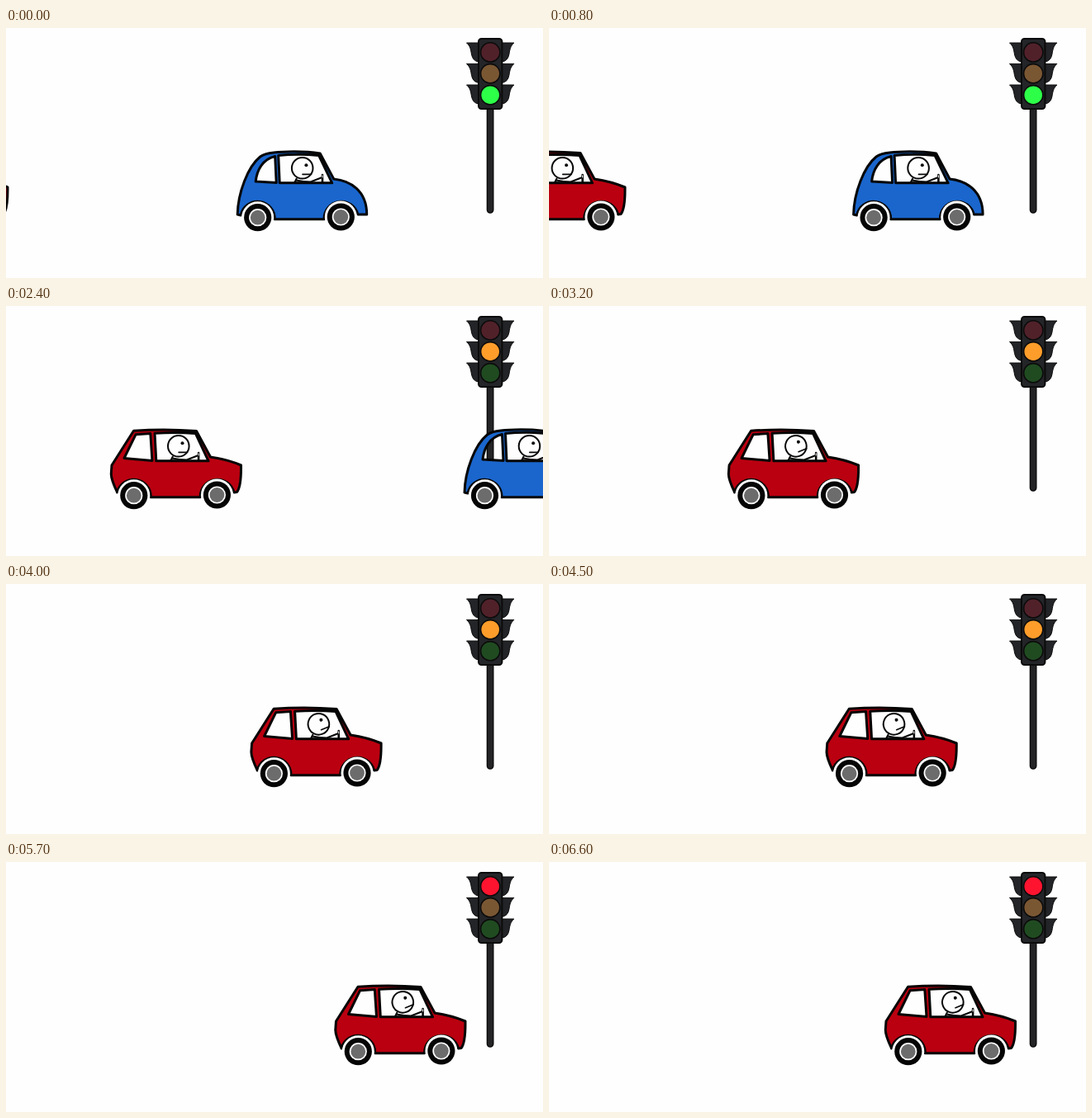
An HTML page that plays this animation: 650x303 px, repeating every 6700 ms.

```html
<!DOCTYPE html>
<html lang="en">
<head>
<meta charset="utf-8">
<title>Two cars and a traffic light</title>
<style>
  html, body { margin: 0; width: 100%; height: 100%; overflow: hidden; background: #fefefe; }
  svg { display: block; width: 650px; height: 303px; }
  .body { stroke: #050505; stroke-width: 3; stroke-linejoin: round; fill-rule: evenodd; }
  .line { fill: none; stroke: #080808; stroke-width: 2; stroke-linecap: round; stroke-linejoin: round; }
  .lamp { stroke: #0b0b0b; stroke-width: 1.6; }
</style>
</head>
<body>
<svg viewBox="0 0 650 303">
  <defs>
    <g id="wheel">
      <circle r="19.5" fill="#fefefe"/>
      <circle r="16.6" fill="#050505"/>
      <circle r="10.6" fill="#fefefe"/>
      <circle r="8.9" fill="#6c6c6c"/>
    </g>
    <g id="wheels">
      <use href="#wheel" x="26" y="229.7"/>
      <use href="#wheel" x="126.6" y="229"/>
    </g>
    <g id="torso" class="line">
      <path d="M73 182.5L70.5 187.5M72.5 184.5C79 186 84 186.5 90 186.5L104 181"/>
      <path d="M70.5 187.3H91" stroke-width="1.4"/>
      <path d="M104.3 178V187" stroke-width="2.6"/>
      <path d="M104.3 178.8V181" stroke="#fefefe" stroke-width="1"/>
    </g>
    <g id="head">
      <circle r="12.8" class="line" style="fill:#fefefe"/>
      <circle cx="4.7" cy="-3.6" r="2" fill="#080808"/>
      <path d="M.3 7.6H10.8" class="line" style="stroke-width:1.6"/>
    </g>
    <path id="visor" d="M572 18H557.5C562 22 562.5 26 563.5 32Q565 40 572 41Z"
      fill="#232427" stroke="#0b0b0b" stroke-linejoin="round"/>
    <g id="visors">
      <use href="#visor"/>
      <use href="#visor" y="25.4"/>
      <use href="#visor" y="51"/>
    </g>
  </defs>

  <g>
    <rect x="582.4" y="92" width="7.4" height="132" rx="3.5" fill="#242427" stroke="#0b0b0b" stroke-width="1.4"/>
    <use href="#visors"/>
    <use href="#visors" transform="translate(1172.4) scale(-1 1)"/>
    <rect x="572" y="13" width="28.4" height="85" rx="3.5" fill="#242528" stroke="#0b0b0b" stroke-width="2"/>
    <circle class="lamp" cx="586.2" cy="29.4" r="11.6"/>
    <circle class="lamp" cx="586.2" cy="55.2" r="11.6"/>
    <circle class="lamp" cx="586.2" cy="81.2" r="11.6"/>
  </g>

  <g id="blue">
    <use href="#torso"/>
    <use href="#head" x="80" y="169.8"/>
    <path class="body" fill="#1a66cd" d="M1.5 226C2 200 14 168 29 156C36 150.5 52 150 70 149.8
      Q88 149.8 101.5 152L118 183C138 185 158 197 158 226L147.2 226
      A20.7 20.7 0 0 0 106.4 231.8H46.5A20.7 20.7 0 0 0 5.5 227Z
      M23.5 186C25 172 32 159 47 155.5L48.5 187.5Z
      M51 154.5Q75 152 100 154.5L116 187.8H52.5Z"/>
    <use href="#wheels"/>
  </g>

  <g id="red">
    <use href="#torso" x="2.8"/>
    <use id="redHead" href="#head"/>
    <path class="body" fill="#ba0010" d="M8.5 225.5C4 216 1 208 1.3 203L2 193L28.5 151.3
      Q66 148.5 104.5 151.5L121.5 183Q142 186 158.5 193Q158.8 219 153.5 225.5L150 226
      A20.7 20.7 0 0 0 109.2 231.8H49.3A20.7 20.7 0 0 0 8.5 226Z
      M17 184.5L31 155.8L48.8 154.5L51 187.5Z
      M54 154.2Q80 152.5 103.5 154.5L119 187.8H55.8Z"/>
    <use href="#wheels" x="2.8"/>
  </g>
</svg>
<script>
  const LOOP = 6700, STEP = 100;
  const AMBER_AT = 23, RED_AT = 46;
  const $ = id => document.getElementById(id);
  const lamps = document.querySelectorAll('.lamp');
  const lit = ['#ff1430', '#ff9d2b', '#2dff49'];
  const dim = ['#51212a', '#7a5733', '#204b21'];

  // [step, x] along the red car's slowing approach
  const stops = [[0, -156.5], [8, -66.5], [16, 30], [24, 126], [28, 172.3], [35, 247.7],
    [40, 295.6], [50, 369.2], [56, 395], [63, 405.4], [66, 406]];

  function slope(i) {
    const a = stops[Math.max(i - 1, 0)], b = stops[Math.min(i + 1, stops.length - 1)];
    return (b[1] - a[1]) / (b[0] - a[0]);
  }

  // Hermite curve through the stops
  function redX(n) {
    let i = 0;
    while (i < stops.length - 2 && n > stops[i + 1][0]) i++;
    const [t0, a] = stops[i], [t1, b] = stops[i + 1];
    const h = t1 - t0, u = (n - t0) / h, v = 1 - u;
    return v * v * (1 + 2 * u) * a + u * u * (3 - 2 * u) * b
      + h * u * v * (v * slope(i) - u * slope(i + 1));
  }

  const blueX = n => 278.7 + 10.85 * n + 0.025 * n * n;

  function draw(now) {
    const n = Math.floor((now % LOOP) / STEP);
    const on = n < AMBER_AT ? 2 : n < RED_AT ? 1 : 0;
    lamps.forEach((lamp, i) => lamp.setAttribute('fill', (i === on ? lit : dim)[i]));
    $('blue').setAttribute('transform', `translate(${blueX(n)})`);
    $('red').setAttribute('transform', `translate(${redX(n)})`);
    const tilt = -22 * Math.min(Math.max((n - 24) / 5, 0), 1);
    $('redHead').setAttribute('transform', `translate(82.8 169.8) rotate(${tilt})`);
  }

  const start = performance.now();
  function tick() {
    draw(performance.now() - start);
    requestAnimationFrame(tick);
  }
  tick();
</script>
</body>
</html>
```
